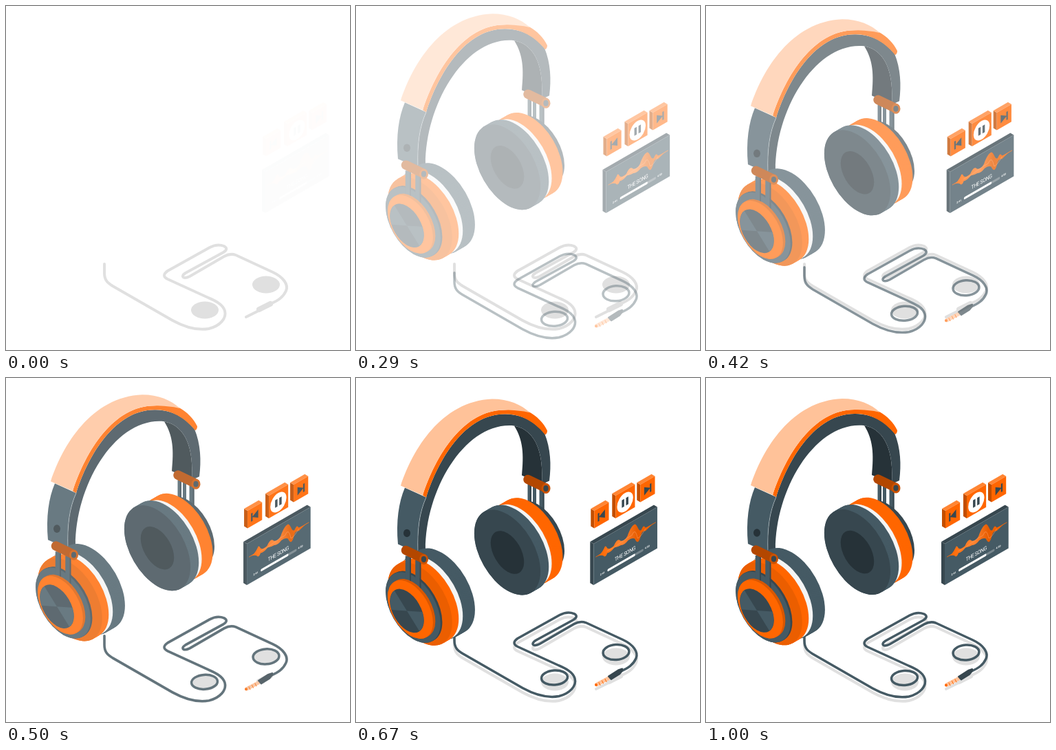
Recreate the animation shown at these times as an HTML page. Size 500 by 500 pixels, loop 1.04 s.

```html
<!DOCTYPE html>
<html lang="en">
<head>
<meta charset="utf-8">
<title>Headphones</title>
<style>
  html, body { margin: 0; width: 100%; height: 100%; overflow: hidden; background: #fff; }
  svg { display: block; width: 100vw; height: 100vh; }
  text { font-family: Roboto, Arial, sans-serif; fill: #fff; }
  .line { fill: none; stroke-linecap: round; stroke-linejoin: round; }
</style>
</head>
<body>
<svg viewBox="0 0 500 500">
  <defs>
    <path id="wire" d="M143 369v13c0 10 4 14 12 19L242 451C262 462 278 466 295 463C311 459 321 448 318 437C315 427 303 422 294 418L235 391Q225 386 235 379L296 345Q307 339 317 343Q324 347 316 352L261 382Q255 386 258 388.500Q261 390 267 387L317 358Q326 353 334 356L388 381C403 388 411 399 407 408C403 417 396 422 384 427"/>
    <linearGradient id="glow" x1="0" x2="1">
      <stop offset="0" stop-color="#ff6600"/>
      <stop offset=".45" stop-color="#ff8533"/>
      <stop offset=".7" stop-color="#e65c00"/>
      <stop offset="1" stop-color="#ff6600"/>
    </linearGradient>
  </defs>

  <g id="shadow" transform="translate(0 6)" fill="#e0e0e0" stroke="#e0e0e0">
    <use href="#wire" class="line" stroke-width="4"/>
    <ellipse cx="289" cy="436" rx="20" ry="12.5" stroke="none"/>
    <ellipse cx="378" cy="399" rx="20" ry="12.5" stroke="none"/>
    <path class="line" stroke-width="4" d="M349 446L367 437"/>
    <path class="line" stroke-width="8" d="M368 435L384 427"/>
  </g>

  <g id="cable">
    <g class="line" stroke="#455a64" stroke-width="3.500">
      <use href="#wire"/>
      <ellipse cx="288.500" cy="436" rx="19" ry="10.500" transform="rotate(-4 288.5 436)"/>
      <ellipse cx="378" cy="399" rx="19" ry="11" transform="rotate(-4 378 399)"/>
    </g>
    <path class="line" stroke="#ffc299" stroke-width="5.500" d="M350 446L367 437"/>
    <path class="line" stroke="#ff6600" stroke-width="1" d="M353 443l2 4M357.500 440.500l2 4M362 438l2 4"/>
    <circle cx="349" cy="446.500" r="2" fill="#ff6600"/>
    <path class="line" stroke="#37474f" stroke-width="2" fill="#37474f" style="fill:#37474f" d="M367 434L381 425L387 423L387 426L383 431L371 438.500Z"/>
  </g>

  <g id="phones">
    <path d="M252 154V195M259.500 157V195" fill="none" stroke="#455a64" stroke-width="5"/>
    <path d="M270 160V205" fill="none" stroke="#455a64" stroke-width="7"/>
    <path d="M254 156V195M272.500 160V205" fill="none" stroke="#37474f" stroke-width="2"/>
    <g id="rightCup"></g>

    <path fill="#263238" d="M230 69C262 75 273 110 270 154L241 141C244 110 243 90 230 69Z"/>
    <path fill="#37474f" d="M102 173C120 116 160 51 217 52C245 52 262 66 274 80C283 102 284 126 281 149L270 154C273 110 262 75 230 69C160 62 101 160 101 249L90 254C89 220 92 195 102 173Z"/>
    <path fill="#455a64" d="M71 159L102 173C92 195 89 220 90 254L61 241C58 208 62 180 71 159Z"/>
    <path class="line" stroke="#cfd8dc" stroke-width=".5" d="M90 250C89 220 92 195 102 173"/>
    <path fill="#ff6600" d="M97 170C116 112 156 46 216 46C232 45 245 46 252 49C263 55 273 65 278 76Q278 80 275 82C256 59 236 52 217 52C160 51 120 116 102 173Z"/>
    <path fill="#ffc299" d="M65 156C82 104 124 33 198 30C222 30 240 38 253 50C242 47 228 46 216 46C156 46 116 112 97 170Z"/>
    <ellipse cx="74" cy="225" rx="5" ry="5.800" fill="#263238"/>

    <g id="leftCup"></g>
    <g id="hinges"></g>
  </g>

  <g id="player">
    <g id="boxes"></g>
    <g transform="matrix(.866 -.5 0 1 347 241)">
      <path class="line" stroke="#ff6600" stroke-width=".8" d="M4 21H104"/>
      <path fill="url(#glow)" d="M6 21Q13 22 18 15Q20 11 23 18Q28 23 34 20Q40 11 45 18Q52 23 57 17C61 9 65 6 69 6C74 8 75 21 80 20Q84 13 87 20Q94 22 102 20Q92 23 87 25Q83 22 80 26C76 38 73 36 69 27Q64 23 58 24Q52 28 46 25Q40 25 35 23Q28 27 23 25Q20 31 16 25Q12 22 6 21Z"/>
      <path class="line" stroke="#ffa366" stroke-width=".5" d="M23 22Q36 23 46 21T64 20Q70 10 74 29Q79 30 87 22"/>
      <text x="35.500" y="43.500" font-size="8" letter-spacing="-.45">THE SONG</text>
      <g class="line" stroke-width="3.500">
        <path stroke="#78868d" d="M68 50.500H82"/>
        <path stroke="#fff" d="M25 50.500H68"/>
      </g>
      <text x="11" y="52" font-size="4" font-weight="700">2:41</text>
      <text x="86" y="51" font-size="4" font-weight="700">4:50</text>
    </g>
  </g>
</svg>
<script>
  const byId = id => document.getElementById(id);

  // A circle seen on the right-falling isometric plane.
  const disc = ([x, y, r, fill]) =>
    `<circle r="${r}" fill="${fill}" transform="matrix(.866 .5 0 1 ${x} ${y})"/>`;
  const discs = list => list.map(disc).join('');

  // A solid made by stacking slices along the depth axis.
  const drum = (x, y, r, depth, fill) => discs(
    Array.from({ length: depth + 1 }, (_, i) =>
      [x + .866 * (depth - i), y - .5 * (depth - i), r, fill]));

  byId('rightCup').innerHTML =
    drum(258, 231.5, 45, 7, '#37474f') +
    disc([258, 231.5, 46, '#b84a00']) +
    drum(242, 240.5, 53.5, 14, '#ff6600') +
    drum(236, 244, 53, 3, '#f5f5f5') +
    drum(220, 253, 55.5, 14, '#455a64') +
    discs([[220, 253, 55.5, '#37474f'], [220, 253, 28, '#263238']]);

  byId('leftCup').innerHTML =
    drum(111, 317, 55.5, 16, '#455a64') +
    drum(105, 320.5, 54, 4, '#f5f5f5') +
    drum(93, 328, 54, 11, '#ff6600') +
    disc([93, 328, 54, '#eb5e00']) +
    drum(83, 333, 46, 3, '#37474f') +
    disc([83, 333, 46, '#455a64']) +
    `<path d="M75 258V302M89.500 264V306" fill="none" stroke="#455a64" stroke-width="6.5"/>
     <path d="M79 260V302M93.500 264V306" fill="none" stroke="#37474f" stroke-width="2"/>` +
    drum(79, 336, 38, 4, '#d95700') +
    discs([[79, 336, 38, '#ff6600'], [74, 338, 28.5, '#37474f']]) +
    `<g transform="matrix(.866 .5 0 1 74 338)" fill="#455a64">
       <path id="wedge" d="M0 0L-26 11.500A28.500 28.500 0 0 1 -21 -19Z"/>
       <use href="#wedge" transform="rotate(180)"/>
     </g>`;

  const hinge = (x, y) =>
    `<path class="line" stroke="#b34700" stroke-width="13.5" d="M${x - 26} ${y - 13}L${x - 1} ${y - 1}"/>
     <ellipse cx="${x}" cy="${y}" rx="6.5" ry="7.5" fill="#cc5200"/>
     <ellipse cx="${x}" cy="${y}" rx="3.6" ry="4.4" fill="#37474f"/>`;
  byId('hinges').innerHTML = hinge(98.5, 263) + hinge(276, 160);

  // A flat box on the right-rising plane; x, y is the front's top left corner.
  const box = (x, y, w, h, [front, top, side], art = '') =>
    `<path fill="${side}" d="M${x - 5} ${y - 3}l5 3v${h}l-5 -3z"/>
     <path fill="${top}" d="M${x - 5} ${y - 3}l${w * .866} ${-w * .5}l5 3L${x} ${y}z"/>
     <g transform="matrix(.866 -.5 0 1 ${x} ${y})">
       <rect width="${w}" height="${h}" fill="${front}"/>${art}
     </g>`;
  const orange = ['#ff6600', '#ff8533', '#c24e00'];
  const slate = ['#455a64', '#37474f', '#37474f'];
  const skip = '<path fill="#37474f" d="M6 7h2.500v5.500L18 7v12L8.500 13.500V19H6z"/>';
  const pause = `<circle cx="16" cy="17.500" r="13.500" fill="#fff"/>
    <path fill="#37474f" d="M10.500 12h4v11h-4zM17.500 12h4v11h-4z"/>`;

  byId('boxes').innerHTML =
    box(347, 241, 107, 60, slate) +
    box(348, 193, 24.5, 25.5, orange, skip) +
    box(379, 171, 32.5, 33, orange, pause) +
    box(415, 155, 24.5, 25.5, orange, `<g transform="translate(24.5 0) scale(-1 1)">${skip}</g>`);

  const bezier = (a, b, s) => 3 * (1 - s) ** 2 * s * a + 3 * (1 - s) * s * s * b + s ** 3;

  // cubic-bezier(.36, -.01, .5, 1.38)
  function ease(p) {
    if (p >= 1) return 1;
    let lo = 0, hi = 1;
    for (let i = 0; i < 24; i++) {
      const mid = (lo + hi) / 2;
      if (bezier(.36, .5, mid) < p) lo = mid; else hi = mid;
    }
    return bezier(-.01, 1.38, lo);
  }

  // [element, x start, y start, duration, lowest opacity]
  const parts = [
    ['cable', 0, 30, 1000, 0],
    ['phones', 0, -30, 1000, 0],
    ['player', 30, 0, 900, .012]
  ].map(([id, ...rest]) => [byId(id), ...rest]);

  const loop = 1040, lead = 33;
  // 24 pictures per second, rounded to 10 ms; the opening pose is held.
  const steps = Array.from({ length: 25 }, (_, k) => Math.round(k * 100 / 24) * 10);

  function draw(now) {
    const t = now % loop;
    const k = steps.filter(s => s <= t).length - 1;
    const time = k < 3 ? 0 : k * 1000 / 24 + lead;
    for (const [el, dx, dy, duration, faint] of parts) {
      const y = ease(time / duration);
      el.setAttribute('transform', `translate(${dx * (1 - y)} ${dy * (1 - y)})`);
      el.setAttribute('opacity', Math.min(1, Math.max(faint, y)));
    }
  }

  const start = performance.now();
  function tick() {
    draw(performance.now() - start);
    requestAnimationFrame(tick);
  }
  tick();
</script>
</body>
</html>
```
